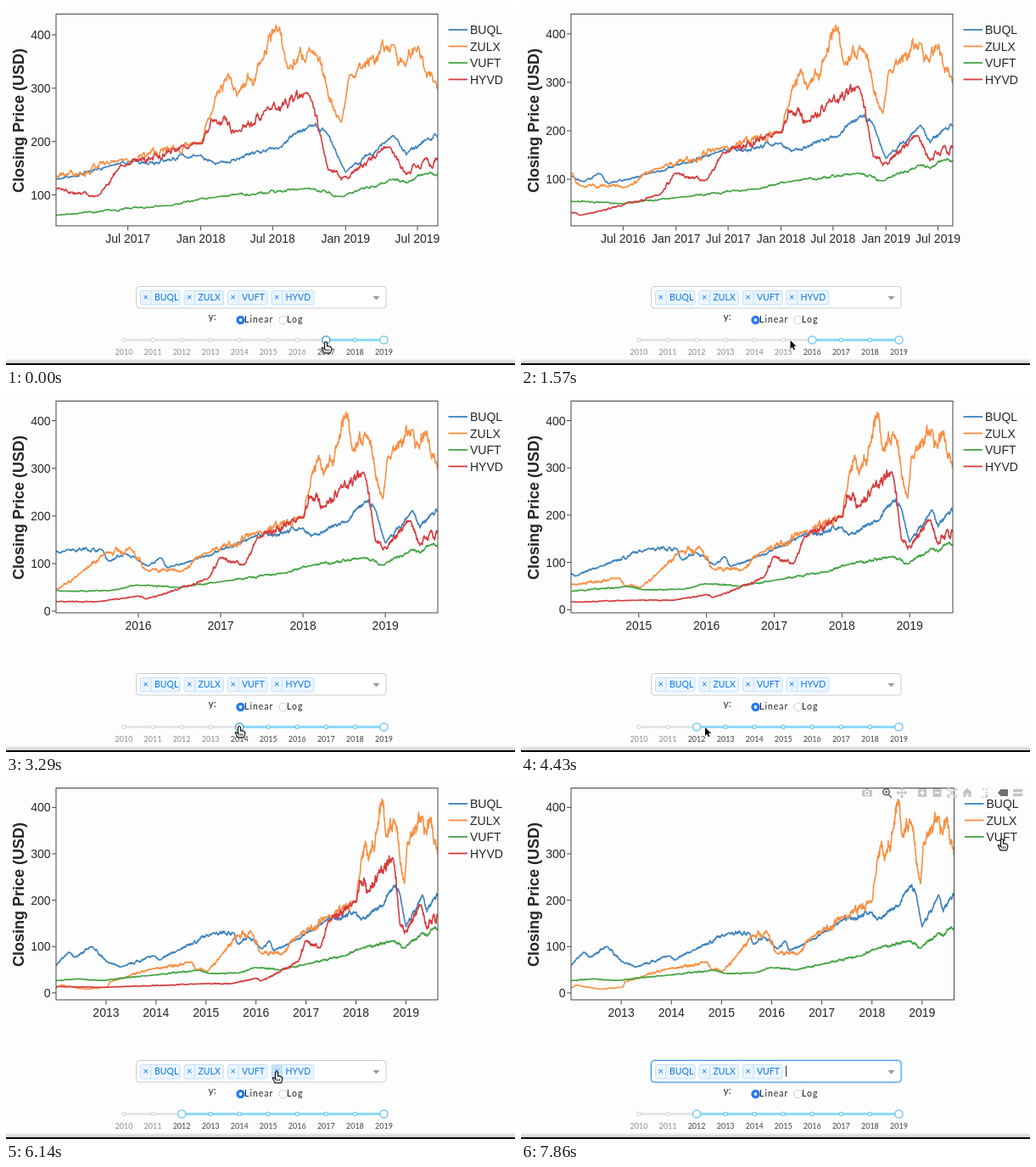
An HTML page that plays this animation: 600x423 px, repeating every 8000 ms.

```html
<!DOCTYPE html>
<html lang="en">
<head>
<meta charset="utf-8">
<title>Closing prices</title>
<style>
  html, body { margin: 0; width: 600px; height: 423px; overflow: hidden; background: #fdfdfd; }
  svg { display: block; font: 14px "Liberation Sans", Arial, sans-serif; fill: #262626; }
  .ui { font-family: Lato, sans-serif; }
</style>
</head>
<body>
<svg id="stage" width="600" height="423" viewBox="0 0 600 423"></svg>
<script>
// Turning points as pairs: hundredths of a year since 2012, price.
const blue = [0,59, 25,88, 38,77, 72,100, 106,64, 130,56, 195,80, 208,72, 242,91, 315,130, 356,129, 364,105,
  384,121, 412,95, 428,111, 436,91, 480,114, 512,135, 537,155, 600,175, 610,157, 656,190, 675,231, 687,215,
  700,143, 733,210, 742,175, 757,207, 764,210];
const orange = [0,11, 10,17, 60,8, 104,13, 107,24, 195,52, 270,67, 280,50, 304,48, 330,80, 360,123, 392,129,
  410,86, 454,86, 481,122, 543,163, 600,196, 608,258, 619,327, 625,285, 642,352, 652,418, 660,337, 675,376,
  697,236, 703,325, 733,381, 741,346, 750,379, 756,320, 764,300];
const green = [0,27, 45,30, 90,27, 190,38, 287,49, 306,42, 365,43, 397,55, 448,50, 500,62, 579,80, 607,95,
  675,113, 697,97, 733,130, 742,122, 755,140, 764,138];
const red = [0,14, 90,12, 300,20, 350,20, 400,32, 410,26, 450,47, 485,69, 499,112, 529,98, 545,155, 600,196,
  607,243, 626,220, 645,258, 675,286, 688,147, 697,128, 730,190, 742,138, 756,170, 760,150, 764,170];

// Daily prices between turning points, with seeded mean-reverting noise that fades out at each of them.
let seed = 7;
const rand = () => (seed = (seed * 16807) % 2147483647) / 2147483647 - 0.5;
function daily(knots, wobble) {
  const out = [];
  let drift = 0;
  for (let i = 0; i < knots.length - 2; i += 2) {
    const [t0, v0, t1, v1] = knots.slice(i, i + 4);
    const days = Math.round((t1 - t0) * 2.52);
    for (let d = 0; d < days; d++) {
      const k = d / days;
      drift = drift * 0.85 + rand() * wobble;
      out.push([2012 + (t0 + (t1 - t0) * k) / 100,
        (v0 + (v1 - v0) * k) * (1 + drift * Math.sqrt(Math.sin(Math.PI * k)))]);
    }
  }
  return out;
}
const series = [
  { name: "BUQL", color: "#3b82bd", data: daily(blue, 0.034) },
  { name: "ZULX", color: "#f98f43", data: daily(orange, 0.06) },
  { name: "VUFT", color: "#43a443", data: daily(green, 0.034) },
  { name: "HYVD", color: "#d63c3e", data: daily(red, 0.06) }
];

// Everything below is timed in ticks of 1/7 s.
const TICKS = 56, REMOVED = 45, END = 2019.637, PEAK = 419;
const LEFT = 59, TOP = 9.5, BOTTOM = 259;
const starts = [[0, 2017], [7, 2016], [18, 2015], [25, 2014], [34, 2012]]; // first year charted
const picks = [[0, 2017], [3, 2016], [14, 2015], [22, 2014], [27, 2012]];  // slider handle
const moves = [ // tick of departure, x, y, hand?
  [0, 377, 396, 1], [1, 344, 396, 1], [8, 317.5, 394, 0], [12, 309, 395, 1], [20, 275, 393, 1],
  [25, 207, 394, 1], [28, 217, 394, 0], [34, 319, 344, 1], [46, 361.5, 316, 0], [52, 567, 70, 1]
];
const last = (list, n) => list.filter(e => e[0] <= n).pop();

const text = (x, y, s, more = "") => `<text x="${x}" y="${y}" ${more}>${s}</text>`;
const line = (d, stroke, width = 1, more = "") =>
  `<path d="${d}" fill="none" stroke="${stroke}" stroke-width="${width}" ${more}/>`;
const rect = (x, y, w, h, more) => `<rect x="${x}" y="${y}" width="${w}" height="${h}" ${more}/>`;
const dot = (x, y, r, fill, stroke = "none", width = 1) =>
  `<circle cx="${x}" cy="${y}" r="${r}" fill="${fill}" stroke="${stroke}" stroke-width="${width}"/>`;

function chart(n) {
  const start = last(starts, n)[1];
  const fewer = n >= REMOVED + 2;
  const right = fewer ? 510.5 : 509, shown = fewer ? series.slice(0, 3) : series;
  const lines = series.map(s => s.data.filter(p => p[0] >= start));
  const min = Math.min(...lines.flat().map(p => p[1]));
  const pad = (PEAK - min) / 18, low = min - pad;
  const X = t => LEFT + (t - start) * (right - LEFT) / (END - start);
  const Y = v => BOTTOM - (v - low) * (BOTTOM - TOP) / (PEAK + pad - low);
  const frame = more => rect(LEFT, TOP, right - LEFT, BOTTOM - TOP, more);

  let s = `<clipPath id="plot">${frame("")}</clipPath><g clip-path="url(#plot)">`;
  shown.forEach(({ color }, i) => {
    const pts = lines[i].map(p => X(p[0]).toFixed(1) + " " + Y(p[1]).toFixed(1));
    s += line("M" + pts.join("L"), color, 1.6, 'stroke-linejoin="round"');
  });
  s += "</g>" + frame('fill="none" stroke="#444"');
  for (let v = 0; v <= 400; v += 100) {
    if (v < low) continue;
    s += line(`M54 ${Y(v)}h5`, "#444") + text(52.5, Y(v) + 5, v, 'text-anchor="end"');
  }
  const step = start >= 2016 ? 0.5 : 1;
  for (let t = start + step; t < END; t += step) {
    const july = t % 1 > 0;
    const x = X(july ? t - 0.004 : t);
    const month = step < 1 ? (july ? "Jul " : "Jan ") : "";
    s += line(`M${x} 259.5v5`, "#444") + text(x, 279, month + Math.floor(t), 'text-anchor="middle"');
  }
  s += text(0, 0, "Closing Price (USD)",
    'transform="translate(21 135) rotate(-90)" text-anchor="middle" font-size="18" font-weight="bold"');
  shown.forEach(({ name, color }, i) => {
    const x = right + 12.5, y = 28 + i * 19.5;
    s += line(`M${x} ${y}h22.5`, color, 1.8) + text(x + 25.5, y + 5, name);
  });
  return s;
}

function dropdown(n) {
  const focus = n >= REMOVED;
  let s = focus ? rect(152, 329, 297.5, 28.5, 'rx="5" fill="#d6eaff"') : "";
  s += rect(153.5, 330.5, 294.5, 25.5, `rx="3.5" fill="#fff" stroke="${focus ? "#2a8cf0" : "#ccc"}"`);
  series.slice(0, focus ? 3 : 4).forEach(({ name }, i) => {
    const x = 158.5 + i * 51.5;
    s += rect(x, 335.5, i === 3 ? 50 : 46.5, 16.5, 'rx="2" fill="#ebf5ff" stroke="#c2e0ff"');
    if (i === 3 && n >= 37) s += rect(x, 335.5, 12.5, 16.5, 'rx="2" fill="#c9e0fa"');
    s += line(`M${x + 12.5} 335.5v16.5`, "#c2e0ff") +
      text(x + 6.2, 347, "×", 'font-size="11" fill="#0b78e8" text-anchor="middle"') +
      text(x + 16.5, 347, name, 'font-size="10.5" fill="#0b78e8"');
  });
  if (focus && Math.floor((n - REMOVED) / 3.5) % 2 === 0) s += line("M312.5 336.5v13", "#333");
  return s + '<path d="M432.5 342h8l-4 4.5z" fill="#999"/>';
}

function controls(n) {
  const spaced = 'font-size="10.5" letter-spacing="1"';
  let s = text(238.5, 369.5, "y:", 'font-size="12"') +
    dot(276.5, 370, 5.2, "#2479ee") + dot(276.5, 370, 1.9, "#fff") + dot(326.5, 370, 4.8, "#fff", "#ccc") +
    text(281, 373, "Linear", spaced) + text(331, 373, "Log", spaced);
  const X = year => 139 + (year - 2010) * 34.05;
  const from = last(picks, n)[1];
  s += line(`M${X(2010)} 393.5H${X(2019)}`, "#e6e4e4", 3, 'stroke-linecap="round"') +
    line(`M${X(from)} 393.5H${X(2019)}`, "#8fd9f7", 3);
  for (let year = 2010; year <= 2019; year++) {
    const on = year >= from;
    s += dot(X(year), 393.5, 2.1, "#fff", on ? "#7accee" : "#dcdada", 1.3) +
      text(X(year), 411, year, `font-size="9" text-anchor="middle" fill="${on ? "#444" : "#8c8c8c"}"`);
  }
  const { x, y, hand } = pointer(n);
  const hover = hand && y > 380 && Math.abs(x - X(from)) < 8;
  return s + dot(X(from), 393.5, 4.6, "#fff", hover ? "#4aa9d8" : "#74cdf0", 1.5) +
    dot(X(2019), 393.5, 4.6, "#fff", "#74cdf0", 1.5);
}

function modebar(n) {
  const opacity = Math.max(0, Math.min(1, (n - 51) / 2));
  if (!opacity) return "";
  const pale = "#c4c4c4", dark = "#707070";
  const box = (x, d) => rect(x - 5, 10, 10, 10, `rx="1" fill="${pale}"`) + line(d, "#fff", 1.6);
  return `<g opacity="${opacity}">` +
    rect(402, 11.5, 12, 8, `rx="1" fill="${pale}"`) + rect(405.5, 10, 5, 3, `fill="${pale}"`) +
    dot(408, 15.5, 2.3, pale, "#fff", 1.2) +
    dot(430.5, 14, 3.7, "none", dark, 1.8) + line("M433 17l4 4M429 14h3M430.5 12.5v3", dark, 1.6) +
    line("M449 9.5v11M443.5 15h11M447 11.5l2-2 2 2M447 18.5l2 2 2-2M445.5 13l-2 2 2 2M452.5 13l2 2-2 2", pale, 1.3) +
    box(473, "M470 15h6M473 12v6") + box(490.5, "M487.5 15h6") +
    line("M503 13v-3h3M510 10h3v3M513 17v3h-3M506 20h-3v-3M505 12l6 6M511 12l-6 6", pale, 1.5) +
    `<path d="M526 9.5l6 5.5h-1.5v5h-3v-3.5h-3v3.5h-3v-5H520z" fill="${pale}"/>` +
    line("M543 20h2m2 0h2M549 10v2m0 2v2M544 11h2", pale, 1.6) + dot(549, 18.5, 1.6, pale) +
    `<path d="M562 15l3.5-4h8.5v8h-8.5z" fill="${dark}"/>` +
    line("M580 12.5h11.5M580 17.5h11.5", pale, 3.4) + "</g>";
}

// Each move eases from the previous stop in three ticks.
function pointer(n) {
  const to = last(moves, n), from = moves[moves.indexOf(to) - 1] || to;
  const k = Math.min(1, (n - to[0]) / 3), ease = k * k * (3 - 2 * k);
  return {
    x: from[1] + (to[1] - from[1]) * ease,
    y: from[2] + (to[2] - from[2]) * ease,
    hand: to[3]
  };
}

function cursor(n) {
  const { x, y, hand } = pointer(n);
  const shape = hand
    ? `<path d="M-1.5 1Q-1.5-.3 0-.3T1.5 1V5Q3 4.2 3.6 5.2Q5 4.5 5.4 6Q6.8 5.8 6.8 7.5Q6.8 10.5 5.4 12.8H-2
        Q-2.8 10.5-4.6 8Q-5 6.4-3.8 6.6L-1.5 8.3Z" fill="#fff" stroke="#111" stroke-width="1.2"/>` +
      line("M-.3 8v3m2-3v3m2-3v3", "#111", 0.8)
    : `<path d="M0 0V11L2.5 8.6L4.3 12.6L6.1 11.8L4.3 7.9H7.8Z" fill="#000" stroke="#fff"
        paint-order="stroke" transform="scale(.9)"/>`;
  return `<g transform="translate(${x} ${y})">${shape}</g>`;
}

const edge = `<linearGradient id="shade" x2="0" y2="1"><stop stop-color="#fdfdfd"/>
  <stop offset="1" stop-color="#ccc"/></linearGradient>` +
  rect(0, 415, 600, 6, 'fill="url(#shade)"') + rect(0, 421, 600, 2, 'fill="#000"');

const stage = document.getElementById("stage");
let drawn = -1;
function frame(now) {
  const n = Math.floor((now + 5) * 0.007) % TICKS;
  if (n !== drawn) {
    drawn = n;
    stage.innerHTML = edge + chart(n) + modebar(n) +
      `<g class="ui">${dropdown(n)}${controls(n)}</g>` + cursor(n);
  }
  requestAnimationFrame(frame);
}
frame(0);
</script>
</body>
</html>
```
